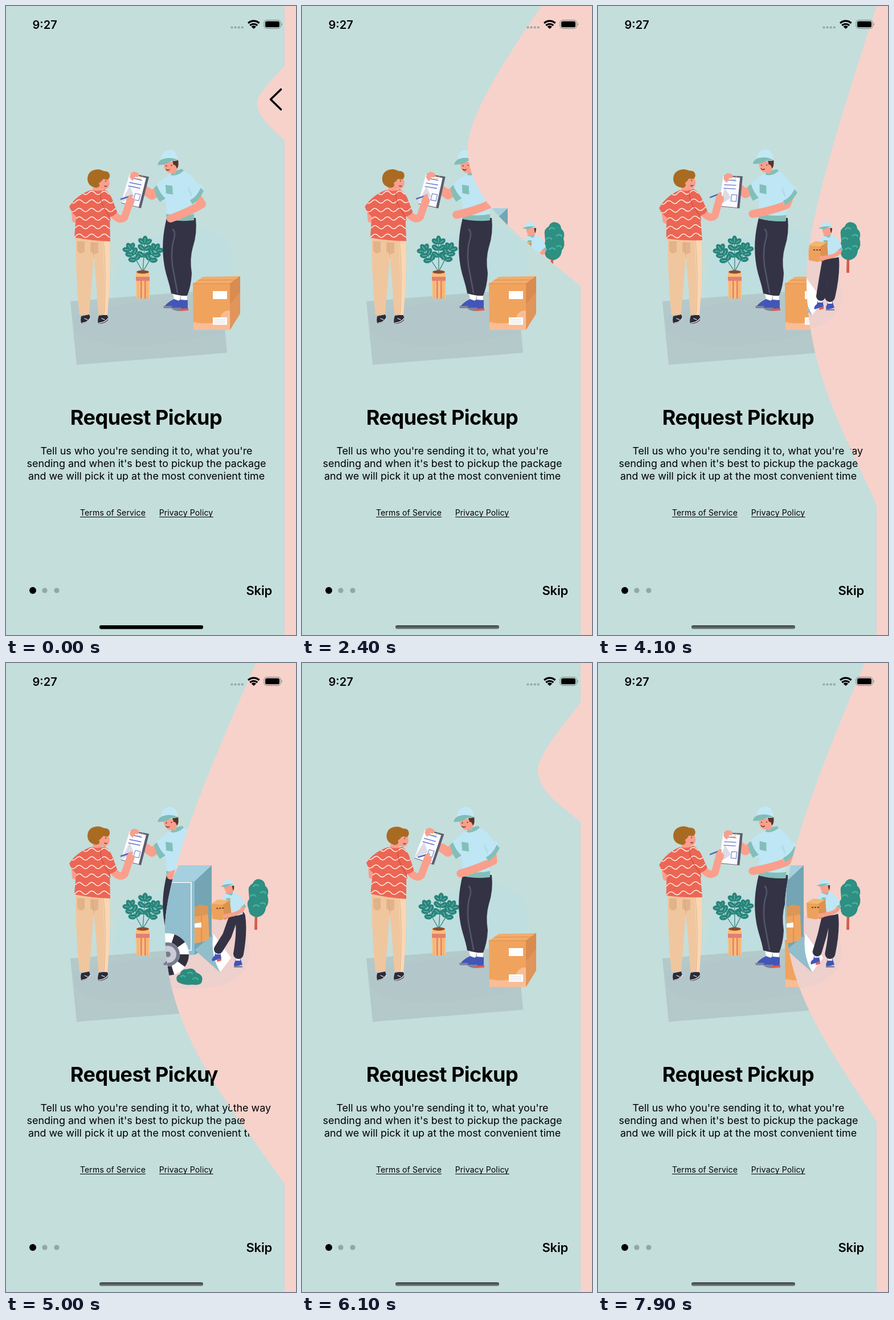
Animation, 509 px wide and 1101 px high, one loop 8000 ms. Source, as an HTML page:

```html
<!DOCTYPE html>
<html lang="en">
<head>
<meta charset="utf-8">
<title>Onboarding swipe</title>
<style>
html, body { margin: 0; width: 100%; height: 100%; overflow: hidden; background: #c4dedb; }
svg { display: block; width: 509px; height: 1101px; font-family: Inter, sans-serif; }
.title { font-size: 36px; font-weight: 700; letter-spacing: -.5px; }
.body { font-size: 17.9px; }
.link { font-size: 14px; letter-spacing: .15px; }
.skin { fill: #f99f8c; }
.limb { fill: none; stroke: #f99f8c; stroke-linecap: round; stroke-linejoin: round; }
.line { fill: none; stroke-linecap: round; stroke-linejoin: round; }
</style>
</head>
<body>
<svg viewBox="0 0 509 1101">
<defs>
  <clipPath id="reveal"><path id="wave"/></clipPath>
  <clipPath id="shirtClip"><path id="shirt" d="M149 322Q162 326 173 321Q183 327 188 342L195 361Q190 368 182 369L183 412Q150 411 120 405L123 368Q115 362 111 351Q124 331 149 322Z"/></clipPath>
  <linearGradient id="barShade" x2="0" y2="1"><stop stop-color="#3a4040"/><stop offset="1" stop-color="#747f80"/></linearGradient>
</defs>
<rect width="509" height="1101" fill="#c4dedb"/>

<g id="pickup">
  <path d="M192 470C196 425 230 415 270 398C320 375 388 388 396 435C400 480 380 540 320 580C250 610 188 590 184 520Z" fill="#bfdee0"/>
  <path d="M113 517L378 496L388 607L124 628Z" fill="#b4c9ca"/>
  <path d="M122 570Q190 620 384 570L377 510Q240 510 116 540Z" fill="#b2c7cc" opacity=".6"/>

  <g id="plant"></g>
  <path d="M228 467H252V512H229Z" fill="#fabd77"/>
  <path d="M232 474V512M248 474V512" stroke="#e9a76c"/>
  <path d="M228 474H252V481H228ZM236 481H238.500V512H236ZM243 481H245.500V512H243Z" fill="#e27f70"/>
  <ellipse cx="240" cy="465.500" rx="11" ry="3" fill="#8d4a2c"/>

  <g>
    <path d="M328 486H393V567H329Z" fill="#f0a35d"/>
    <path d="M328 486L346 474L411 473L393 486Z" fill="#f4ac6b"/>
    <path d="M393 486L411 473V538L393 567Z" fill="#d98b50"/>
    <path d="M329 553Q372 562 378 540Q384 532 393 533V567H329Z" fill="#f9bd96"/>
    <path d="M393 522L411 500V538L393 567Z" fill="#e0955b"/>
    <path d="M328 486H393L411 473M337 480L402 479.500" fill="none" stroke="#d88f4e"/>
    <path d="M363 499H388V513H363ZM363 545H388V558H363Z" fill="#fff"/>
    <path d="M366 549H385M366 552H385M366 555H385" stroke="#cfd3d8" stroke-width=".8"/>
  </g>

  <path d="M293 503L306 504L304 518L296 517ZM306 505L318 507L317 518L308 517Z" fill="#fff"/>
  <path d="M295 513Q284 518 278 526L304 527L306 517Z" fill="#4356b8"/>
  <path d="M276 525L304 525L304 529L277 529Z" fill="#7f8396"/>
  <path d="M306 514Q296 519 290 528Q304 533 319 530L319 515Z" fill="#4356b8"/>
  <path d="M289 528L308 528L306 534Q294 534 289 528Z" fill="#7f8396"/>
  <path d="M306 530L320 529V533L305 534Z" fill="#e25b4c"/>
  <path d="M282 371H333Q336 398 328 422Q322 442 326 468Q325 490 318 507Q306 508 290 503C287 485 281 472 278 455C273 425 275 400 282 371Z" fill="#343345"/>
  <path class="line" d="M293 391Q299 397 293 414Q288 440 295 470L301 502" stroke="#55566a" stroke-width="2.500"/>

  <g id="man">
    <path class="limb" d="M276 318L256 331L246 324" stroke-width="16"/>
    <path d="M281 299Q292 292 300 288L316 290Q334 302 341 322L329 339V374Q306 378 282 373L281 341L268 342L261 318Q270 305 281 299Z" fill="#bfe6f4"/>
    <path d="M265 314Q270 328 280 337L270 343Q262 332 260 318ZM289 296Q301 299 312 288L309 285L291 290ZM281 364Q306 369 330 364V375Q306 378 282 373Z" fill="#82bfb9"/>
    <path d="M280 313L292 315L293 330L281 328Z" fill="#82bfb9"/>
    <path d="M321 317Q326 333 329 339M318 320Q326 328 329 344" class="line" stroke="#a6d4e4"/>
    <path class="limb" id="arm" stroke-width="14"/>
    <path d="M328 317L341 311Q347 318 346 324Q337 340 324 346Z" fill="#bfe6f4"/>
    <path d="M342 318L347 324Q338 341 327 347L323 340Q335 334 342 318Z" fill="#82bfb9"/>
    <path class="skin" d="M277 273Q276 288 286 292L298 293L302 273Z"/>
    <path d="M292 271L302 269Q304 280 300 285Q298 277 294 278Z" fill="#5a3427"/>
    <path class="line" d="M281 280l1 0M290 279l1 0M281 286q4 3 6 0" stroke="#43262c" stroke-width="1.300"/>
    <path d="M272 268Q272 254 287 252Q300 252 302 270Q287 274 272 268Z" fill="#c3e8f5"/>
    <path d="M266 278Q268 267 285 266Q296 266 302 270Q289 270 284 275Q274 279 266 278Z" fill="#7fbdb8"/>
  </g>

  <g id="board">
    <path d="M219 293L251 299L237 354L202 345Z" fill="#5b5e6e"/>
    <path d="M217 294L246 301L233 352L202 344Z" fill="#fbfbfe"/>
    <path d="M217 315L225 333L202 344Z" fill="#dcdce6"/>
    <path class="line" d="M221 301L238 305M217 309L237 313M215 315L235 319" stroke="#6176c9" stroke-width="1.400"/>
    <path d="M227 328L236 330L233 341L224 339Z" fill="none" stroke="#6176c9"/>
    <path class="line" d="M230 302Q238 304 240 298" stroke="#e9b978"/>
    <path class="skin" d="M217 299Q218 292 224 290Q232 290 234 296L231 300L227 299L222 306Q219 304 217 299Z"/>
  </g>

  <path d="M132 543L146 540L148 546Q144 555 133 556Q130 553 132 543ZM163 542L177 540Q180 545 179 550Q172 557 162 556Q160 551 163 542Z" fill="#2c2b38"/>
  <path class="line" d="M134 555Q143 554 148 546M163 555Q174 554 179 547M138 547l5 2M168 547l5 2" stroke="#eeeef2" stroke-width="1.300"/>
  <path d="M122 400L182 406Q184 440 182 475L178 541L162 540L158 480L154 435L151 478L146 540L129 541Q122 470 122 400Z" fill="#f0c69f"/>
  <path d="M169 408L182 409Q184 470 178 541H171Q175 470 169 408Z" fill="#fad7b3"/>
  <path d="M125 412H138V430Q130 437 125 428ZM148 414H162V431Q154 438 148 429Z" fill="#e2b289"/>
  <path d="M171 410Q177 470 172 540M152 412L154 440" class="line" stroke="#d8a67b" stroke-width=".8"/>

  <g id="woman">
    <path class="limb" d="M120 362L121 374" stroke-width="10"/>
    <path class="limb" d="M187 363Q199 378 208 370L218 341" stroke-width="13"/>
    <path class="line" d="M202 338L221 332" stroke="#4f66bd" stroke-width="2.500"/>
    <path class="skin" d="M211 347Q209 338 218 330L222 331L222 336Q228 339 224 347L219 352Z"/>
    <path class="skin" d="M153 312H168V323Q160 328 152 323Z"/>
    <use href="#shirt" fill="#ec6654"/>
    <g clip-path="url(#shirtClip)"><path class="line" id="stripes" stroke="#fff0ec" stroke-width="1.500"/></g>
    <path class="line" d="M166 327Q163 343 182 369L183 376" stroke="#c9483e"/>
    <g id="head">
      <path class="skin" d="M163 302L180 300L182 311Q180 321 173 321L161 319Z"/>
      <path class="line" d="M175 306v1M177 315q-3 2-4 0" stroke="#5b3030" stroke-width="1.300"/>
      <path d="M143 302Q144 286 163 286Q168 287 172 289Q183 289 182 299Q180 306 173 303Q170 302 168 306L165 309Q165 319 157 318Q143 315 143 302Z" fill="#a96b22"/>
      <circle class="skin" cx="166" cy="311" r="2.600"/>
    </g>
  </g>
</g>
<g text-anchor="middle">
  <text class="title" x="246" y="733">Request Pickup</text>
  <g class="body">
    <text x="246.500" y="785">Tell us who you're sending it to, what you're</text>
    <text x="246.500" y="807">sending and when it's best to pickup the package</text>
    <text x="246.500" y="829">and we will pick it up at the most convenient time</text>
  </g>
  <g class="link"><text x="187.500" y="892">Terms of Service</text><text x="316" y="892">Privacy Policy</text></g>
  <path d="M130 894.500H245M269 894.500H364" stroke="#000"/>
</g>

<g clip-path="url(#reveal)">
  <rect width="509" height="1101" fill="#f7d2cb"/>
  <path d="M150 540C150 450 250 420 330 440C400 440 430 465 428 510C425 545 395 570 330 570H190Q150 570 150 540Z" fill="#eed0cd"/>
  <path d="M290 382L303 354H361L331 382Z" fill="#a5d0df"/>
  <path d="M180 382H331V511H180Z" fill="#91bfcf"/>
  <path class="line" d="M220 384H325V503H310" stroke="#fff" stroke-width="1.600"/>
  <path d="M331 382L361 354V492L331 511Z" fill="#73a5b4"/>
  <path d="M331 427L340 423L355 425V446L331 448Z" fill="#dc9656"/>
  <path d="M331 444L355 440L357 486L331 491Z" fill="#efa45e"/>
  <path d="M343 442V489" stroke="#c97f42"/>
  <path d="M331 456L343 454V463H331Z" fill="#fff"/>
  <path d="M331 502L363 476Q360 510 376 542Z" fill="#92bdca"/>
  <path d="M364 474L395 516L376 541Q358 510 364 474Z" fill="#fff"/>
  <g id="wheel">
    <circle cx="284" cy="510" r="37" fill="#fff"/>
    <circle cx="284" cy="510" r="29" fill="none" stroke="#30303f" stroke-width="16" stroke-dasharray="18.220 18.220"/>
    <circle cx="284" cy="510" r="21" fill="#777b8c"/><circle cx="284" cy="510" r="15" fill="#c9cbd6"/><circle cx="284" cy="510" r="5" fill="#777b8c"/>
  </g>
  <path d="M301 558Q296 548 305 545Q308 535 318 536Q329 532 334 542Q347 546 344 557Q343 565 327 563Q311 565 301 558Z" fill="#2c8b7f"/>
  <path class="line" d="M307 549q4-4 7 0M319 543q5-4 8 1M328 553q6-4 9 1" stroke="#3fb09c" stroke-width="2.500"/>
  <path d="M437 430H441V467H436Z" fill="#d65e49"/>
  <path d="M426 401Q424 390 433 386Q437 376 447 379Q455 382 455 390Q463 396 459 407Q463 420 456 428Q455 442 441 445Q426 443 426 431Q421 420 427 413Z" fill="#2e8f82"/>
  <path class="line" d="M434 391q4-5 9-1M429 408q5-5 9 0M447 402q6-4 9 1M434 426q5-5 10 0M447 421q5-3 8 1" stroke="#42b6a2" stroke-width="2.500"/>
  <g id="feet">
    <g id="footFront"><path d="M386 515H394L396 526L380 531Q378 526 384 522Z" fill="#4356b8"/><path d="M386 512H394V519H386Z" fill="#fff"/><path d="M389 528L396 526V530L388 532Z" fill="#e25b4c"/></g>
    <path d="M403 516H411L415 528L401 532Q399 526 402 523Z" fill="#4356b8"/><path d="M403 513H411V521H403Z" fill="#fff"/><path d="M400 530.500H415V533H400Z" fill="#7f8396"/>
  </g>
  <path id="legBack" class="line" stroke="#343345" stroke-width="18"/>
  <path id="legFront" class="line" stroke="#343345" stroke-width="16"/>
  <g id="courier">
    <path d="M393 405Q404 398 415 403Q425 408 428 422L423 427L424 439Q408 445 391 436L388 412Z" fill="#bfe6f4"/>
    <path d="M396 410H403V418H396ZM421 427L428 422L430 427L424 432ZM394 401L409 399L406 406Z" fill="#82bfb9"/>
    <path class="skin" d="M393 388H409Q411 401 403 403Q394 402 393 388Z"/>
    <path d="M407 388L411 388Q411 395 409 398Z" fill="#5a3427"/>
    <path d="M391 389Q391 379 400 378Q409 378 411 389Q400 387 391 389Z" fill="#bfe6f4"/>
    <path d="M387 389Q396 384 410 386Q401 388 397 391Z" fill="#7fbdb8"/>
    <path d="M369 419L381 412L402 414L404 442L385 448L370 445Z" fill="#eca25c"/>
    <path d="M369 419L381 412L402 414L390 421Z" fill="#f5b673"/>
    <path d="M390 421L402 414L404 442L391 448Z" fill="#dc9250"/>
    <path d="M378 427h3m2 0h3m2 0h3" stroke="#684226" stroke-width="2"/>
    <path class="limb" d="M424 430Q418 439 392 441" stroke-width="7"/>
  </g>
  <text class="title" x="372" y="733" text-anchor="end">Fast Delivery</text>
  <g class="body" text-anchor="end">
    <text x="465" y="785">We keep you posted on your parcel all the way</text>
    <text x="420" y="807">so that you know when it will be there</text>
  </g>
</g>

<path id="chevron" class="line" d="M482.500 146L464.500 163.500L482.500 181" stroke="#000" stroke-width="3.600"/>
<text x="46.500" y="39.500" font-size="20" font-weight="600">9:27</text>
<path class="line" d="M396.500 37.500H417" stroke="#93a7a5" stroke-width="4.200" stroke-dasharray="0 6.100"/>
<g fill="none" stroke="#000" stroke-width="3.200"><path d="M425 30A14 14 0 0 1 444.500 30M428.300 34.200A9 9 0 0 1 441.200 34.200"/></g>
<path d="M434.800 40L430.600 36.200A5.600 5.600 0 0 1 439 36.200Z"/>
<rect x="453" y="24.800" width="29" height="14.500" rx="4.300" fill="none" stroke="#6f7f7d"/>
<rect x="455" y="26.800" width="25" height="10.500" rx="2.600"/>
<path d="M483.500 29.500Q486 32 483.500 34.500Z" fill="#6f7f7d"/>
<circle cx="47" cy="1023" r="6"/>
<g fill="#93a7a4"><circle cx="68" cy="1023" r="4.600"/><circle cx="89" cy="1023" r="4.600"/></g>
<text x="421.500" y="1030.500" font-size="22" font-weight="600" letter-spacing="-.2">Skip</text>
<rect x="164" y="1084" width="182" height="6.500" rx="3.200" fill="url(#barShade)"/>
<rect id="bar" x="164" y="1084" width="182" height="6.500" rx="3.200"/>
</svg>

<script>
const LOOP = 8000, STEP = 100, SWAY = 5000, EDGE = 489;
const $ = id => document.getElementById(id);
const set = (id, name, value) => $(id).setAttribute(name, value);
const clamp = v => Math.max(0, Math.min(1, v));

// time, top of wave, tip x, tip y, bottom of wave
const WAVE = [
  [0, 105, 441, 168, 235], [900, 105, 441, 168, 235], [1000, 104, 440, 170, 237],
  [1500, 68, 413, 208, 318], [1800, -5, 365, 225, 395], [2400, -97, 291, 250, 490],
  [2800, 14, 375, 270, 455], [3200, 62, 402, 315, 530], [3600, 28, 395, 410, 710],
  [4100, 0, 366, 475, 873], [4500, -62, 318, 480, 910], [5000, -111, 279, 468, 912],
  [5400, -50, 330, 360, 660], [5700, 18, 385, 250, 420], [6100, 70, 414, 187, 278],
  [6600, 75, 416, 200, 295], [7200, 33, 385, 310, 520], [7900, -50, 328, 428, 803]
];
// phase, body lean, forearm swing, plant tilt
const POSE = [
  [0, .33, 1, .9], [1100, 0, .4, .9], [1500, .07, 0, .7], [2400, .47, 0, 0],
  [2900, 1, 0, 0], [4100, 1, 0, 0], [5000, .33, 1, .9]
];
const STRIDE = [[0, 0], [2400, 0], [4100, 0], [5000, 1], [6000, .1], [7000, 0], [7900, .35]];

// Hermite interpolation through timed rows
function sample(rows, t) {
  const last = rows.length - 1;
  let i = 0;
  while (i < last - 1 && rows[i + 1][0] <= t) i++;
  const a = rows[i], b = rows[i + 1], span = b[0] - a[0];
  const u = Math.min(1, (t - a[0]) / span);
  const slope = (j, k) => {
    const p = rows[Math.max(0, j - 1)], n = rows[Math.min(last, j + 1)];
    return (n[k] - p[k]) / (n[0] - p[0]) * span;
  };
  return a.slice(1).map((v, j) => {
    const k = j + 1, w = u * u * (3 - 2 * u);
    return v + (b[k] - v) * w + u * (1 - u) * ((1 - u) * slope(i, k) - u * slope(i + 1, k));
  });
}

function wavePath([top, x, y, bottom]) {
  const mid = (EDGE + x) / 2, up = y - top, down = bottom - y;
  return `M509 -200H${EDGE}V${top}C${mid} ${top + .4 * up} ${x} ${y - .2 * up} ${x} ${y}` +
    `C${x} ${y + .4 * down} ${mid} ${bottom - .34 * down} ${EDGE} ${bottom}V1101H509Z`;
}

function buildDetails() {
  let stripes = '';
  for (let y = 327; y < 412; y += 15) stripes += `M101 ${y}q5.500 -6 11 0` + 't11 0'.repeat(8);
  set('stripes', 'd', stripes);

  // three bare stems, each ending in a spray of paired leaves
  const leaf = (x, y, angle) => `<g transform="translate(${x} ${y}) rotate(${angle})">` +
    '<ellipse rx="4.600" ry="7" fill="#27847b"/><path d="M0 5V-3" stroke="#7cc4b8"/></g>';
  let plant = '';
  for (const [x, y] of [[-24, -42], [4, -54], [25, -41]]) {
    const angle = Math.atan2(x, -y) * 180 / Math.PI;
    plant += `<path class="line" d="M240 465L${240 + x} ${465 + y}" stroke="#2f7f76" stroke-width="1.200"/>`;
    for (const f of [.48, .7, .9]) {
      for (const side of [-1, 1]) {
        const turn = angle + side * 55, r = turn * Math.PI / 180;
        plant += leaf(240 + x * f + 7 * Math.sin(r), 465 + y * f - 7 * Math.cos(r), turn);
      }
    }
    plant += leaf(240 + x, 463 + y, angle);
  }
  $('plant').innerHTML = plant;
}

function draw(t) {
  set('wave', 'd', wavePath(sample(WAVE, t)));
  set('chevron', 'opacity', clamp(1 - (t - 1000) / 540));
  set('bar', 'opacity', clamp((800 - t) / 500));

  const [lean, swing, tilt] = sample(POSE, t % SWAY), d = lean - .33;
  set('woman', 'transform', `rotate(${-5.5 * d} 152 410)`);
  set('head', 'transform', `translate(${-6 * d} 0)`);
  set('man', 'transform', `rotate(${Math.max(0, 5.2 * d)} 303 372)`);
  set('board', 'transform', `translate(${4 * d} ${2 * d}) rotate(${-13 * d} 235 296)`);
  set('plant', 'transform', `rotate(${5 * (tilt - .9)} 240 465)`);
  const hand = 271 + 18 * swing, elbow = 330 + 14 * swing;
  set('arm', 'd', `M334 332L${elbow} ${346 + swing}Q${elbow - 22} ${357 + 3 * swing} ${hand} ${366 + 6 * swing}`);

  const [step] = sample(STRIDE, t);
  set('courier', 'transform', `translate(${-8 * step} ${step}) rotate(${-3 * step} 408 440)`);
  set('legBack', 'd', `M${414 - 3 * step} 443Q${416 - step} 470 ${407 + step} 509`);
  set('legFront', 'd', `M${402 - 2 * step} 443L${396 - 8 * step} 477L${391 - 18 * step} ${508 - 7 * step}`);
  set('footFront', 'transform', `translate(${-18 * step} ${-9 * step})`);
}

function tick(now) {
  draw(Math.floor(now % LOOP / STEP) * STEP);
  requestAnimationFrame(tick);
}

buildDetails();
draw(0);
requestAnimationFrame(tick);
</script>
</body>
</html>
```
